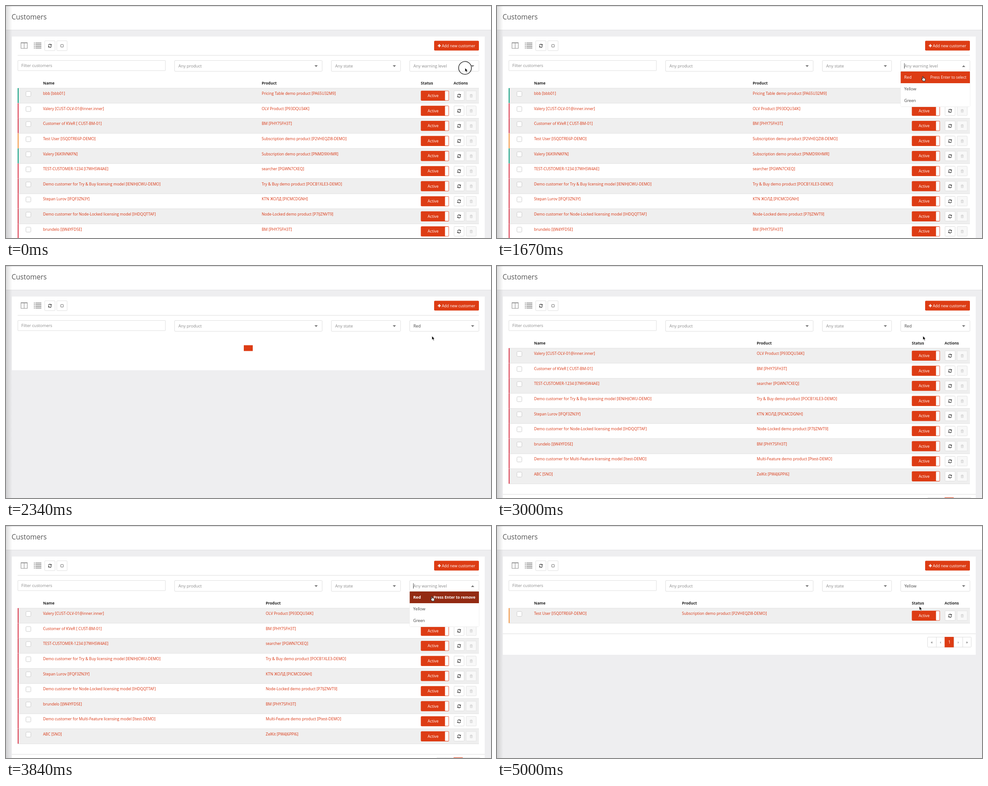
An HTML page for the animation above (5.08 s loop, 1083x517 px).

```html
<!DOCTYPE html>
<html lang="en">
<head>
<meta charset="utf-8">
<title>Customers</title>
<style>
  html, body { margin: 0; width: 100%; height: 100%; overflow: hidden; background: #eeeef0; }
  svg { display: block; width: 1083px; height: 517px; font-family: "Open Sans", "Noto Sans", sans-serif; }
</style>
</head>
<body>
<svg id="stage" viewBox="0 0 1083 517" xmlns="http://www.w3.org/2000/svg"></svg>
<script>
const LOOP = 5080, STEP = 82.9;
const ACCENT = '#dd3c14', LINK = '#d9330f';
const LEVEL = { red: '#dc4457', yellow: '#f39a4b', green: '#1da488' };
const ROW_TOP = 183, ROW_HEIGHT = 33.6;

const customers = [
  ['green', 'bbb [bbb01]', 'Pricing Table demo product [PA65U32M9]'],
  ['red', 'Valery [CUST-OLV-01@inner.inner]', 'OLV Product [P93DQU34K]'],
  ['red', 'Customer of KVeR [ CUST-BM-01]', 'BM [PHY75FH3T]'],
  ['yellow', 'Test User [I5QDTRE6P-DEMO]', 'Subscription demo product [P2VHEQZI8-DEMO]'],
  ['green', 'Valery [I6K9VNKFN]', 'Subscription demo product [PNMD9XHMR]'],
  ['red', 'TEST-CUSTOMER-1234 [I7WHSW4AE]', 'searcher [PGWN7CXEQ]'],
  ['red', 'Demo customer for Try &amp; Buy licensing model [IENIHJCWU-DEMO]', 'Try &amp; Buy demo product [POCB1XLE3-DEMO]'],
  ['red', 'Stepan Lurov [IFQF3ZN3Y]', 'KTN ЖОЛД [PICMCDGNH]'],
  ['red', 'Demo customer for Node-Locked licensing model [IHDQQTTAF]', 'Node-Locked demo product [P7IJZNVT9]'],
  ['red', 'brundelo [IJW4YFD5E]', 'BM [PHY75FH3T]'],
  ['red', 'Demo customer for Multi-Feature licensing model [Itest-DEMO]', 'Multi-Feature demo product [Ptest-DEMO]'],
  ['red', 'ABC [SNO]', 'ZelKit [PW4J6PPI6]']
];

const rect = (x, y, w, h, fill, extra = '') =>
  `<rect x="${x}" y="${y}" width="${w}" height="${h}" fill="${fill}" ${extra}/>`;
const box = (x, y, w, h, stroke, radius = 1.5, fill = '#fff') =>
  rect(x + .5, y + .5, w - 1, h - 1, fill, `stroke="${stroke}" rx="${radius}"`);
const text = (x, y, value, size = 8.55, fill = '#444', extra = '') =>
  `<text x="${x}" y="${y}" font-size="${size}" fill="${fill}" ${extra}>${value}</text>`;
const path = (d, fill, extra = '') => `<path d="${d}" fill="${fill}" ${extra}/>`;
const at = (x, y, body, extra = '') => `<g transform="translate(${x} ${y}) ${extra}">${body}</g>`;
const BOLD = 'font-weight="700"', MIDDLE = 'text-anchor="middle"', END = 'text-anchor="end"';

const caret = (x, angle = 0) => at(x, 134, path('M-3.6-1.9H3.6L0 2.1Z', '#777'), `rotate(${angle})`);

function refreshIcon(x, y) {
  const half = path('M-3.3-.7A3.3 3.3 0 0 1 2.4-2.4', 'none', 'stroke="#333" stroke-width="1.3"') +
    path('M3.9-4V-.7H.6Z', '#333');
  return at(x, y, half + `<g transform="rotate(180)">${half}</g>`);
}

const trashIcon = (x, y) => at(x, y,
  path('M-2.3-1.6H2.3V3.3H-2.3ZM-3.2-2H3.2M-1-2V-3.2H1V-2M-.8-.2V2.2M.8-.2V2.2', 'none', 'stroke="#ccc" stroke-width=".8"'));

function toolbar() {
  let out = path('M33.5 82H47.5V94.5H33.5ZM40.5 82V94.5', 'none', 'stroke="#999" stroke-width="1.2"') +
    rect(33, 81, 15, 2, '#999');
  for (let y = 81.5; y < 95; y += 3.7) {
    out += rect(62.3, y, 2.2, 2, '#999') + rect(65.8, y, 13.2, 2, '#999');
  }
  return out + box(86, 77, 24, 23, '#e2e2e2') + refreshIcon(98, 88.7) +
    box(113, 77, 24, 23, '#e2e2e2') +
    rect(122.3, 85.7, 5.6, 5.8, 'none', 'stroke="#777" stroke-width="1.1" rx="1"') +
    rect(956, 77.5, 100, 21.7, ACCENT, 'rx="2"') +
    path('M964.2 88.5H971M967.6 85.1V91.9', 'none', 'stroke="#fff" stroke-width="1.9"') +
    text(973.2, 91.6, 'Add new customer', 8.55, '#fff') +
    rect(26, 109.5, 1030, 1, '#ddd');
}

function filters(ui) {
  const grey = '#8b8b8b', edge = '#dfdfdf';
  const placeholder = ui.typing || !ui.value;
  return box(26, 121, 330.5, 23.5, edge, .5) + text(34.3, 136, 'Filter customers', 9.2, grey) +
    box(376, 121, 330.5, 25, edge) + text(385, 137, 'Any product', 9.2, grey) + caret(692.5) +
    box(726, 121, 155.5, 25, edge) + text(735, 137, 'Any state', 9.2, grey) + caret(867.2) +
    box(901, 121, 155.5, 25, edge) +
    text(909.7, 137, placeholder ? 'Any warning level' : ui.value, 9.2, placeholder ? grey : '#444') +
    (ui.typing ? rect(909.3, 127.5, .9, 12, '#333') : '') + caret(1042, ui.angle);
}

function row([level, name, product], i, productX) {
  const y = ROW_TOP + i * ROW_HEIGHT;
  return rect(26, y, 1030, ROW_HEIGHT, i % 2 ? '#fff' : '#efefef') +
    rect(26, y - .3, 1030, .8, '#dcdcdc') +
    rect(26, y, 2.2, ROW_HEIGHT, LEVEL[level]) +
    box(44, y + 7, 12, 12, '#ccc', 2) +
    text(82.7, y + 15.2, name, 8.55, LINK) +
    text(productX, y + 15.2, product, 8.55, LINK) +
    rect(926.3, y + 5.7, 62.8, 22.4, ACCENT, 'rx="2"') +
    rect(980.3, y + 6.5, 8, 20.8, '#fff', 'rx="1.2"') +
    text(953.7, y + 20, 'Active', 8.8, '#fff', MIDDLE) +
    box(1000, y + 5.5, 23.5, 22.5, '#ddd') + refreshIcon(1011.7, y + 17) +
    box(1027, y + 5.5, 23.5, 22.5, '#e4e4e4', 1.5, '#f8f8f8') + trashIcon(1038.8, y + 17);
}

function pager(y) {
  let out = box(961, y, 98.5, 23.3, '#ddd');
  ['«', '‹', '1', '›', '»'].forEach((label, i) => {
    const x = 961 + i * 19.6, current = i === 2;
    if (current) out += rect(x - .7, y, 20.8, 23.3, ACCENT);
    else if (i) out += rect(x, y, 1, 23.3, '#ddd');
    out += text(x + 9.9, y + 14.8, label, 8.55, current ? '#fff' : '#444', MIDDLE);
  });
  return out;
}

function table(rows, productX) {
  const end = ROW_TOP + rows.length * ROW_HEIGHT;
  const head = (x, label) => text(x, 174.9, label, 8.55, '#222', BOLD);
  return rect(13, 68, 1056, end + 70.4 - 68, '#fff') +
    head(82.7, 'Name') + head(productX, 'Product') + head(926.3, 'Status') + head(999.6, 'Actions') +
    rows.map((entry, i) => row(entry, i, productX)).join('') +
    rect(26, end - .3, 1030, .8, '#dcdcdc') +
    rect(13, end + 23, 1056, 1, '#ddd') + pager(end + 30.5);
}

function loader(frame, start) {
  const flip = Math.abs(Math.cos(Math.PI * (frame - start) * STEP / 600));
  return rect(13, 68, 1056, 164.3, '#fff') +
    at(541, 183, rect(-10, -10, 20, 20, ACCENT), `scale(1 ${flip.toFixed(3)})`);
}

function dropdown(ui) {
  const items = ['Red', 'Yellow', 'Green'].map((name, i) => {
    const y = 146 + i * 26.1, hovered = i === ui.hover, chosen = name === ui.chosen;
    const fill = hovered ? (chosen ? '#932a12' : ACCENT) : chosen ? '#f0f0f0' : '#fff';
    const weight = chosen ? BOLD : '';
    const hint = hovered ? `Press Enter to ${chosen ? 'remove' : 'select'}` : chosen ? 'Selected' : '';
    return rect(901.5, y, 154.5, 26.1, fill) +
      text(909.3, y + 16.2, name, 9.2, hovered ? '#fff' : chosen ? '#35493f' : '#444', weight) +
      text(1048, y + 16, hint, 8.55, hovered ? '#fff' : '#aaa', END + ' ' + weight);
  });
  return `<g opacity="${ui.opacity}">${box(901, 145.5, 155.5, 79.5, '#e4e4e4', 2)}${items.join('')}</g>`;
}

const pointers = {
  arrow: path('M0 0V8.6L2 6.8L3.5 10.2L5.2 9.5L3.7 6.2H6.3Z', '#000', 'stroke="#fff" stroke-width=".8"'),
  beam: path('M-2-4.7Q0-4.7 0-3.6Q0-4.7 2-4.7M0-3.6V4.2M-2 5.3Q0 5.3 0 4.2Q0 5.3 2 5.3M-1.2 1.8H1.2', 'none', 'stroke="#222" stroke-width="1"'),
  hand: path('M-.9 1.5Q.1 .4 1 1.5V5L2.6 4.8L4.2 5.4L5.6 6.3V9L4.7 11.6H.2L-1.4 9L-3 7Q-2.6 5.8-.9 7Z', '#fff',
    'stroke="#111" stroke-width="1" stroke-linejoin="round"') +
    path('M1.4 8V10M3.2 8V10', 'none', 'stroke="#111" stroke-width=".6"')
};

// Pointer stops: frame, x, y
const stops = [[0, 1025, 138], [6, 1025, 138], [11, 961, 138], [15, 961, 138], [19, 951, 156], [37, 951, 156],
  [40, 955, 137], [43, 955, 137], [46, 951, 156], [50, 951, 156], [53, 943, 179], [61, 943, 179]];
const clicks = [-1, 12, 23, 42, 56];

function pointerAt(frame) {
  const i = stops.findIndex(stop => stop[0] > frame);
  const [f0, x0, y0] = stops[i - 1], [f1, x1, y1] = stops[i];
  const p = (frame - f0) / (f1 - f0), eased = p * p * (3 - 2 * p);
  return [x0 + (x1 - x0) * eased, y0 + (y1 - y0) * eased];
}

function menuAt(frame) {
  for (const [open, close] of [[12, 26], [42, 57]]) {
    if (frame >= open && frame < close) {
      const i = Math.min(frame - open, 2);
      return { opacity: [.22, .65, 1][i], angle: [205, 185, 180][i], typing: true };
    }
    if (frame >= close && frame < close + 2) {
      const i = frame - close;
      return { opacity: [.85, .4][i], angle: [205, 300][i], typing: false };
    }
  }
  return { opacity: 0, angle: 0, typing: false };
}

function content(frame) {
  if (frame < 25) return table(customers.slice(0, 10), 571);
  if (frame < 30) return loader(frame, 26);
  if (frame < 57) return table(customers.filter(c => c[0] === 'red'), 580);
  if (frame < 59) return loader(frame, 57);
  return table(customers.filter(c => c[0] === 'yellow'), 413);
}

function scene(frame) {
  const [x, y] = pointerAt(frame);
  const ui = menuAt(frame);
  ui.value = frame < 26 ? '' : frame < 57 ? 'Red' : 'Yellow';
  ui.chosen = ui.value;
  ui.hover = y > 171 ? 1 : 0;
  const kind = !ui.opacity ? 'arrow' : y < 146 ? 'beam' : 'hand';
  const click = clicks.find(start => frame >= start && frame < start + 3);
  const radius = click === undefined ? 0 : [11, 14.3, 11][frame - click];
  return `<defs><linearGradient id="shade"><stop stop-opacity=".13"/><stop offset="1" stop-opacity="0"/></linearGradient></defs>` +
    rect(0, 0, 1083, 517, '#eeeef0') + rect(0, 0, 1083, 53, '#fff') +
    rect(0, 0, 1083, 1.2, '#d6d6d8') + rect(0, 53, 1083, 1, '#e0e0e2') +
    text(12.5, 30.4, 'Customers', 15.5, '#555') +
    content(frame) + toolbar() + filters(ui) +
    (ui.opacity ? dropdown(ui) : '') +
    rect(0, 0, 14, 517, 'url(#shade)') +
    (radius ? `<circle cx="${x}" cy="${y}" r="${radius}" fill="none" stroke="#111" stroke-width="1.3"/>` : '') +
    at(x, y, pointers[kind]);
}

const stage = document.getElementById('stage');
let shown = -1;
function update(now) {
  const frame = Math.min(60, Math.floor((now % LOOP) / STEP));
  if (frame !== shown) {
    shown = frame;
    stage.innerHTML = scene(frame);
  }
}
function tick() {
  update(performance.now());
  requestAnimationFrame(tick);
}
tick();
</script>
</body>
</html>
```
